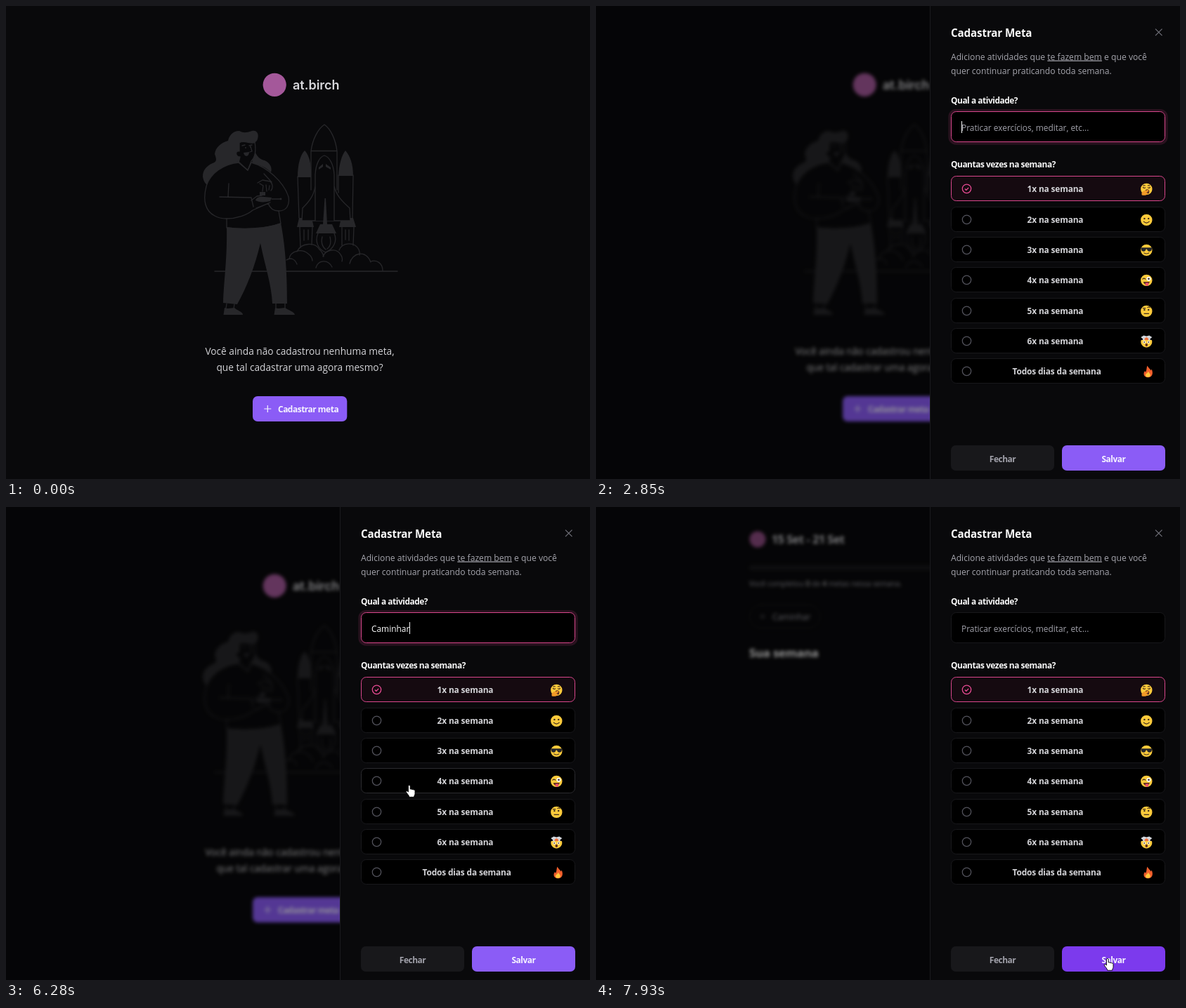
An HTML page that plays this animation: 831 px wide and 674 px high, repeating every 8000 ms.

```html
<!DOCTYPE html>
<html lang="pt-BR">
<head>
<meta charset="utf-8">
<title>Cadastrar meta</title>
<style>
html, body { margin: 0; width: 100%; height: 100%; overflow: hidden; background: #09090b; }
svg { display: block; width: 831px; height: 674px; font-family: "Open Sans", "Noto Sans", sans-serif; }
.mid { text-anchor: middle; }
.bold { font-weight: 650; letter-spacing: -.15px; }
.tight { letter-spacing: -.45px; }
.sm { font-size: 11.9px; }
.line { fill: none; stroke: #27272a; stroke-width: 1.3; stroke-linecap: round; stroke-linejoin: round; }
.fill { fill: #27272a; }
.skin { fill: #09090b; stroke: #27272a; stroke-width: 1.3; stroke-linejoin: round; }
.ink { fill: none; stroke: #3b2a1e; stroke-width: 1.1; stroke-linecap: round; }
</style>
</head>
<body>
<svg viewBox="0 0 831 674">
  <defs>
    <filter id="blur" filterUnits="userSpaceOnUse" x="0" y="0" width="831" height="674" color-interpolation-filters="sRGB">
      <feGaussianBlur stdDeviation="2.9"/>
    </filter>
  </defs>
  <rect width="831" height="674" fill="#09090b"/>

  <g id="empty">
    <circle cx="382.2" cy="112.3" r="16.6" fill="#a4589a"/>
    <text x="408" y="119" font-family="Inter, sans-serif" font-size="18" font-weight="600" fill="#d8d8dc">at.birch</text>

    <path class="line" d="M297 378H557"/>
    <g id="rocket">
      <path class="line" d="M434 262V207C436 190 444 175 453 169C462 175 469 190 471 207V262M434 206.500H471
        M415 243L417 302M434 243V262M494 241L493 302M473 241V266
        M418 315L419 344M436 315L435 340M424 319V334M430 319V333M478 315V341M495 315L494 341M483 319V333M488 319V334
        M444 324C439 335 444 347 455 351C466 346 472 335 467 324M450 329C448 337 450 343 455 347M461 329C463 337 461 343 457 346"/>
      <path class="fill" d="M415 244C415 225 419 212 425 206C430 211 433 220 434 232V244ZM473 242C474 225 478 212 483 206C490 214 494 226 494 242Z
        M417 302H435L438 315H414ZM477 302H494L498 315H474Z"/>
      <path class="skin" d="M440 257C438 270 432 278 422 288L421 306H490L489 288C478 278 470 270 467 257"/>
      <path class="skin" d="M440 306V240C441 225 446 215 453 213C460 215 466 225 467 240V306"/>
      <path class="fill" d="M445 230L451 225V229L445 233ZM455 225L462 230V233L455 229ZM453.500 274H455L457 311H451ZM447 311H464L470 324H441Z"/>
    </g>
    <path class="line" d="M399 362C405 358 411 360 414 368M403 360C405 349 420 345 430 353C434 356 436 360 436 363
      M414 350C420 337 440 336 446 347C450 350 451 353 452 357M451 357C455 347 470 344 476 354C479 358 479 361 478 364
      M474 348C478 337 496 335 502 347C503 350 504 352 503 355M489 367C492 352 512 346 519 365
      M519 364C528 361 536 367 536 377M441 373C444 362 458 360 464 372"/>
    <g id="person">
      <path class="fill" d="M357 192C361 184 358 176 350 178C341 181 338 181 332 178C322 178 317 186 316 192C306 195 298 201 297 211C300 219 300 222 294 224C285 228 280 234 280 243C281 250 284 254 287 255C295 236 310 227 333 223L345 205C350 200 352 196 357 192Z
        M353 204C356 214 362 219 368 220C376 224 379 230 377 237C371 231 362 226 350 224Z"/>
      <path class="skin" d="M331 223C309 225 290 239 285 257C280 276 283 292 297 299C302 302 308 303 314 303L314 316C340 319 370 317 391 310L388 292C399 292 404 284 402 272C395 250 371 229 349 223L344 234Z"/>
      <path class="skin" d="M332 195C338 190 350 198 354 194C356 206 354 216 349 221L344 234L331 223L333 215C326 215 326 205 332 207Z"/>
      <path class="line" d="M314 303C328 303 343 298 351 291L374 281M304 272L349 273L352 286M317 253L316 272M367 239L378 251M388 292C380 292 375 287 373 281M336 199L340 198M346 199L350 198M348 200L350 207L347 208M331 222L344 234L349 223
        M358 252L365 248L376 250C380 254 380 260 377 263M361 253L366 256L365 264M370 255L371 264M375 256L374 262M349 277L357 271L364 270M356 288L366 284L376 280M378 275H391"/>
      <path class="fill" d="M338 209L346 208C346 214 340 217 338 209ZM355 277C356 272 362 271 368 272L378 273L376 278C368 280 360 280 355 277ZM361 265H369V270H361Z"/>
      <circle class="fill" cx="341" cy="202" r="1"/><circle class="fill" cx="348" cy="201" r="1"/><circle class="fill" cx="391" cy="275" r="1.400"/>
      <path class="fill" d="M314 315C340 319 370 317 391 309C397 340 400 375 400 424H379C378 398 369 372 362 338C354 372 342 402 329 425L309 423C310 390 315 360 314 315Z"/>
      <path class="line" d="M314 424L313 431M325 425L324 431M384 424V431M397 424V431"/>
      <path class="fill" d="M311 430C316 432 321 430 325 430C328 434 337 435 337 440H309.500ZM383 430C388 432 393 430 397 430C402 434 410 435 411 440H381.500Z"/>
    </g>

    <g class="mid" font-size="13.7" fill="#d4d4d8">
      <text x="418" y="496.500">Você ainda não cadastrou nenhuma meta,</text>
      <text x="418" y="520">que tal cadastrar uma agora mesmo?</text>
    </g>
    <rect id="open" x="351" y="556" width="134.300" height="36" rx="7"/>
    <path d="M367.300 574H377.300M372.300 569V579" stroke="#f5f3ff" stroke-width="1.200"/>
    <text class="bold sm tight" x="387" y="578.500" fill="#f5f3ff">Cadastrar meta</text>
  </g>

  <g id="summary">
    <circle cx="230" cy="46" r="11.500" fill="#8c4a80"/>
    <text class="bold" x="250" y="52" font-size="15.600" fill="#d0d0d4">15 Set - 21 Set</text>
    <rect x="218" y="83" width="400" height="7" rx="3.500" fill="#18181b"/>
    <text x="218" y="113" font-size="10.400" fill="#a1a1aa">Você completou <tspan fill="#f4f4f5">0</tspan> de <tspan fill="#f4f4f5">4</tspan> metas nessa semana.</text>
    <rect x="218.500" y="139.500" width="100" height="33" rx="16.500" fill="none" stroke="#202023" stroke-dasharray="3 2"/>
    <path d="M233 156H241M237 152V160" stroke="#52525b"/>
    <text class="sm" x="251" y="160.500" fill="#a1a1aa">Caminhar</text>
    <text class="bold" x="218" y="214" font-size="16.700" fill="#fafafa">Sua semana</text>
  </g>

  <g id="dialog">
    <rect width="831" height="674" opacity=".4"/>
    <rect x="475" width="356" height="674" fill="#09090b"/>
    <path d="M475.500 0V674" stroke="#1b1b1e"/>
    <text class="bold" x="505" y="43.500" font-size="15.200" fill="#fafafa">Cadastrar Meta</text>
    <path d="M796 32.700L805.500 42.200M805.500 32.700L796 42.200" stroke="#71717a" stroke-width="1.200"/>
    <g font-size="12.150" fill="#a6a6ae">
      <text x="505" y="76.500">Adicione atividades que <tspan text-decoration="underline">te fazem bem</tspan> e que você</text>
      <text x="505" y="96.700">quer continuar praticando toda semana.</text>
    </g>
    <g class="bold sm tight" fill="#fafafa">
      <text x="505" y="138.500">Qual a atividade?</text>
      <text x="505" y="230.300">Quantas vezes na semana?</text>
    </g>
    <rect id="ring" x="503.200" y="148.700" width="308.600" height="47.200" rx="9" fill="none" stroke="#ec4899" stroke-opacity=".14" stroke-width="3.600"/>
    <rect id="field" x="505.500" y="150.500" width="304" height="43" rx="7"/>
    <text id="value" class="sm" x="520" y="178"></text>
    <rect id="caret" y="164" width="1" height="17" fill="#f4f4f5"/>
    <g id="rows"></g>
    <rect x="505" y="626" width="147" height="36" rx="7" fill="#18181b"/>
    <rect id="save" x="663" y="626" width="147" height="36" rx="7"/>
    <g class="mid bold sm tight">
      <text x="578.500" y="650" fill="#a1a1aa">Fechar</text>
      <text x="736.500" y="650" fill="#f5f3ff">Salvar</text>
    </g>
  </g>

  <circle id="press" r="9.200" fill="#f5cf5a"/>
  <g id="cursor" fill="#fff" stroke="#000" stroke-width=".9" stroke-linejoin="round">
    <path id="arrow" d="M0 -.5V13.200L3 10.600L5 15L7.200 14L5.300 9.700H9.300Z"/>
    <path id="hand" d="M-1.600 .8C-1.600 -1 1.200 -1 1.200 .8V5L3 4.800L3.400 5.500L5.200 5.300L5.700 6.100C7.500 5.800 8 6.600 8 7.600V11.500C8 13 6.800 14 6.600 16.300H-.2C-.6 13.500 -3.500 11.500 -4.700 9C-5 7.200 -3.300 7.200 -1.600 9Z"/>
  </g>
</svg>
<script>
const $ = id => document.getElementById(id);
const LOOP = 8000, ROW_Y = 242.3, STEP = 43.3, ROW_H = 36;
const OPENED = 1740, PRESS_ROW = 6480, PICKED = 6690, SAVED = 7860, LISTED = 7930;
const BLINK = 530;
const KEYS = [3800, 4130, 4200, 4400, 4600, 4670, 4800, 5130];
const PRESSES = [[1560, OPENED], [PRESS_ROW, PICKED], [7600, SAVED]];
const WORD = "Caminhar", HINT = "Praticar exercícios, meditar, etc...";

// time, x, y of the pointer tip
const PATH = [
  [590, 795, 307], [1210, 456, 547], [1350, 453, 564], [1800, 453, 564],
  [2180, 617, 256], [2250, 616, 252], [2600, 560, 212], [2920, 524, 176],
  [5600, 540, 176], [5720, 552, 200], [6030, 598, 447], [6280, 574, 397],
  [6690, 574, 397], [7260, 728, 644]
];

const face = extra => `<circle r="8.200" fill="#fdca3b"/>${extra}`;
const eyes = `<circle cx="-2.900" cy="-2" r="1.200" fill="#3b2a1e"/><circle cx="2.900" cy="-2" r="1.200" fill="#3b2a1e"/>`;
const ink = d => `<path class="ink" d="${d}"/>`;
const EMOJI = [
  face(ink("M-5 -2.500Q-3.500 -.8 -1.500 -2M2 -2Q4 -.8 5.200 -2.500M-4.500 -5L-2 -5.200M2 -5.200L4.500 -5") +
    `<ellipse cx="1" cy="3.500" rx="3" ry="3.200" fill="#5d2d20"/><path d="M-6.500 8.500C-7.500 5 -6 3 -3.500 2.500L2.500 1.200L3 3L0 4.500L2 6C1 8.500 -3 9.500 -6.500 8.500Z" fill="#f39a27"/>`),
  face(eyes + ink("M-4 2.300Q0 6.200 4 2.300")),
  face(`<path d="M-8.200 -3.600H8.200L7 .6Q4 3 1.500 .6L.6 -1.500H-.6L-1.500 .6Q-4 3 -7 .6Z" fill="#25262b"/>` + ink("M-3.500 4Q0 6.200 3.500 4")),
  face(`<circle cx="3.200" cy="-2.200" r="3" fill="#fff"/><circle cx="3.200" cy="-2.200" r="1.300" fill="#3b2a1e"/>` + ink("M-5.500 -1.800Q-3.500 -3.800 -1.500 -1.800") +
    `<path d="M-4.500 2H4.500Q3.500 6 0 6T-4.500 2Z" fill="#5d2d20"/><path d="M-1.500 3.500H3V6.500Q.8 9.200 -1.500 6.500Z" fill="#f0506a"/>`),
  face(eyes + ink("M-3.200 3.500H3.200M-5 -4.300H-1.500M1.500 -5.500Q3.500 -6.800 5 -5.200")),
  `<path d="M-7.600 -2H7.600A8 8 0 1 1 -7.600 -2Z" fill="#fdca3b"/><path d="M-8 -6L-4 -8.500L0 -7.500L4 -8.500L8 -6L5 -3.500L6 -1.500L0 -2.500L-6 -1.500L-5 -3.500Z" fill="#d3d6dc"/><path d="M-3 -4L0 -6L3 -4L2 -2H-2Z" fill="#f2703a"/>
   <circle cx="-3" cy="1" r="1.900" fill="#fff"/><circle cx="3" cy="1" r="1.900" fill="#fff"/><circle cx="-3" cy="1" r=".9" fill="#3b2a1e"/><circle cx="3" cy="1" r=".9" fill="#3b2a1e"/><ellipse cy="5" rx="1.800" ry="2.100" fill="#5d2d20"/>`,
  `<path d="M-1 -8.300C1 -4.500 3 -4 4 -1.500L5 -3.500C8 2 6 8.300 0 8.300C-6 8.300 -7.500 2.500 -4.500 -1L-3.500 1C-1.500 -2 -2.500 -5 -1 -8.300Z" fill="#f4602c"/><path d="M.5 -.5C1 2 4 3.200 3.200 5.800C2 8.800 -3.500 8.500 -3.500 5C-3.500 2.800 -.5 2.500 .5 -.5Z" fill="#ffc83d"/>`
];

// the flame is narrower than a face, which moves it and its label to the right
$("rows").innerHTML = EMOJI.map((emoji, i) => {
  const flame = i === 6, shift = flame ? 2.2 : 0;
  const label = flame ? "Todos dias da semana" : `${i + 1}x na semana`;
  return `<g transform="translate(505 ${Math.round(ROW_Y + STEP * i)})">
    <rect x=".5" y=".5" width="304" height="35" rx="7"/>
    <circle cx="22.500" cy="18.300" r="6.200" fill="none" stroke-width="1.250"/>
    <path d="M19.900 18.500L21.800 20.300L25.200 16.900" fill="none" stroke="#ec4c95" stroke-width="1.250"/>
    <text class="mid bold sm" x="${148.5 + shift}" y="23.300" fill="#d4d4d8">${label}</text>
    <g transform="translate(${278.3 + shift} 18.900)">${emoji}</g></g>`;
}).join("");
const rows = [...$("rows").children].map(g => ({
  box: g.children[0], dot: g.children[1], tick: g.children[2]
}));

const clamp = v => Math.max(0, Math.min(1, v));
const show = (el, on) => el.setAttribute("display", on ? "inline" : "none");
const set = (el, attrs) => { for (const k in attrs) el.setAttribute(k, attrs[k]); };
const inside = (p, x, y, w, h) => p.x >= x && p.x <= x + w && p.y >= y && p.y <= y + h;

function pointer(t) {
  const last = PATH[PATH.length - 1];
  const i = PATH.findIndex(k => k[0] > t);
  if (i < 0) return { x: last[1], y: last[2] };
  if (i === 0) return { x: PATH[0][1], y: PATH[0][2] };
  const [t0, x0, y0] = PATH[i - 1], [t1, x1, y1] = PATH[i];
  const u = (t - t0) / (t1 - t0), e = u * u * (3 - 2 * u);
  return { x: x0 + (x1 - x0) * e, y: y0 + (y1 - y0) * e };
}

// violet-500 to violet-600
function violet(u) {
  const mix = (a, b) => Math.round(a + (b - a) * clamp(u));
  return `rgb(${mix(139, 124)},${mix(92, 58)},${mix(246, 237)})`;
}

function drawField(t) {
  const focused = t < PRESS_ROW;
  const typed = t >= SAVED ? 0 : KEYS.filter(k => k <= t).length;
  const since = typed ? KEYS[typed - 1] : OPENED;
  set($("field"), { stroke: focused ? "#d9468c" : "#18181b" });
  show($("ring"), focused);
  $("value").textContent = typed ? WORD.slice(0, typed) : HINT;
  set($("value"), { fill: typed ? "#fafafa" : "#a1a1aa" });
  show($("caret"), focused && Math.floor((t - since) / BLINK) % 2 === 0);
  set($("caret"), { x: Math.round(520 + (typed ? $("value").getComputedTextLength() : 0)) });
}

function drawRows(t, hovered) {
  const picked = t >= PICKED && t < SAVED ? 3 : 0;
  rows.forEach((row, i) => {
    const on = i === picked;
    set(row.box, {
      fill: on ? "#150a10" : "#000",
      stroke: on ? "#d9468c" : i === hovered ? "#2b2b2f" : "#18181b"
    });
    set(row.dot, { stroke: on ? "#ec4c95" : "#52525b" });
    show(row.tick, on);
  });
}

function draw(t) {
  const p = pointer(t), open = t >= OPENED, listed = t >= LISTED;
  show($("empty"), !listed);
  show($("summary"), listed);
  show($("dialog"), open);
  for (const id of ["empty", "summary"]) {
    if (open) $(id).setAttribute("filter", "url(#blur)");
    else $(id).removeAttribute("filter");
  }

  const overOpen = !open && inside(p, 351, 556, 134, 36);
  const overSave = open && inside(p, 663, 626, 147, 36);
  const row = Math.floor((p.y - ROW_Y) / STEP);
  const overRow = open && row >= 0 && row < 7 &&
    inside(p, 505, ROW_Y + row * STEP, 305, ROW_H);
  const overField = open && inside(p, 505, 151, 305, 43);

  set($("open"), { fill: violet(t < 1900 ? (t - 1270) / 150 : 1 - (t - 1900) / 150) });
  set($("save"), { fill: violet((t - 7190) / 150) });
  if (open) {
    drawField(t);
    drawRows(t, overRow ? row : -1);
  }

  const hand = overOpen || overSave || overRow;
  show($("cursor"), t >= PATH[0][0] && !overField);
  show($("arrow"), !hand);
  show($("hand"), hand);
  set($("cursor"), { transform: `translate(${p.x} ${p.y})` });

  const press = PRESSES.find(([a, b]) => t >= a && t < b);
  show($("press"), press);
  if (press) set($("press"), { cx: p.x - 1, cy: p.y, opacity: .65 });
}

const start = performance.now();
function frame() {
  draw((performance.now() - start) % LOOP);
  requestAnimationFrame(frame);
}
frame();
</script>
</body>
</html>
```
